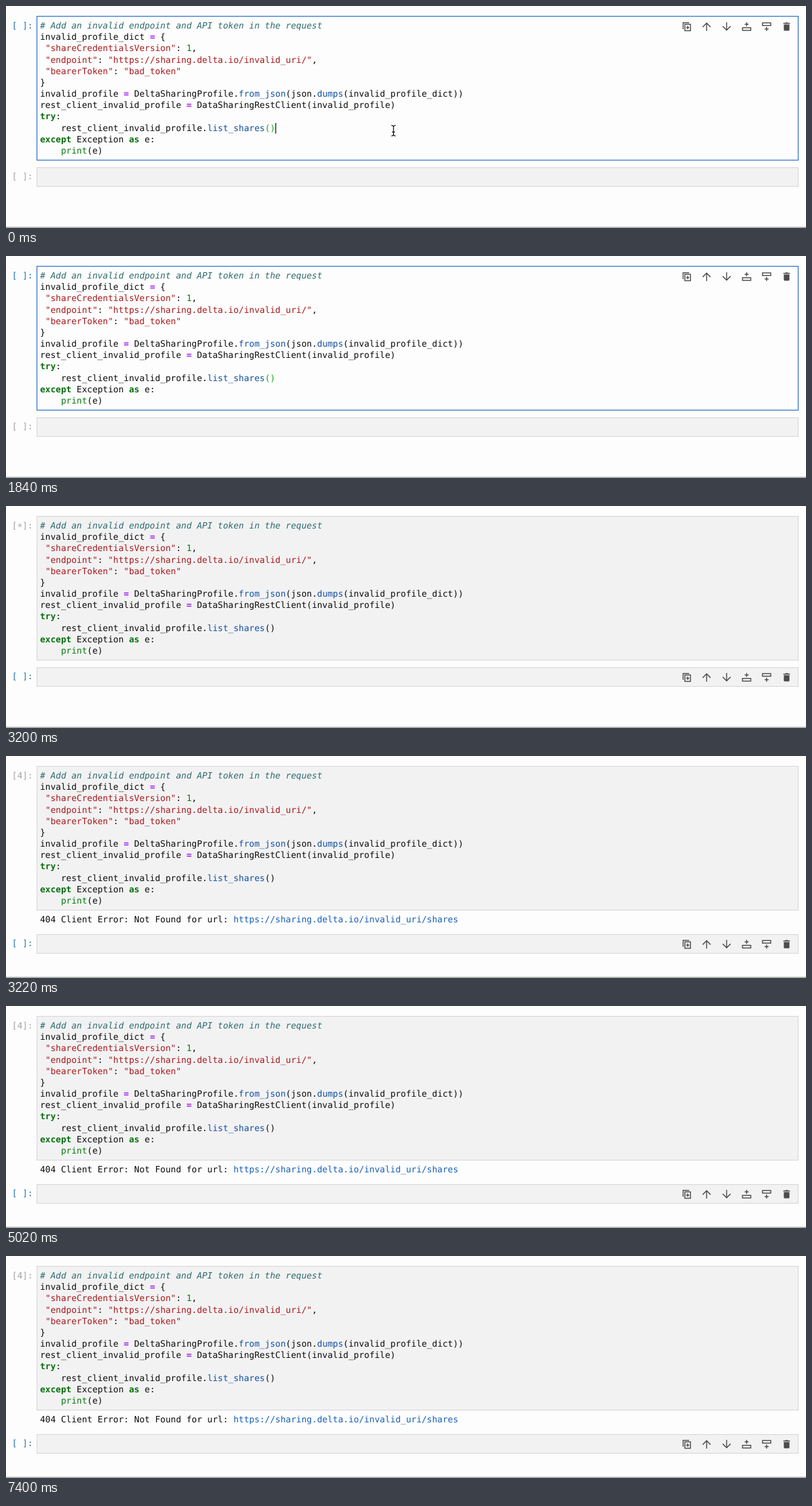
An HTML page that plays this animation: 1280x355 px, repeating every 7500 ms.

```html
<!DOCTYPE html>
<html lang="en">
<head>
<meta charset="utf-8">
<title>Notebook cell run</title>
<style>
  html, body { margin: 0; width: 100%; height: 100%; overflow: hidden; background: #fdfdfd; }
  svg { display: block; width: 1280px; height: 355px; }
  text {
    font: 13.9px "DejaVu Sans Mono", "Liberation Mono", monospace;
    white-space: pre; text-rendering: geometricPrecision; fill: #0c0c0c;
  }
  .comment { fill: #2e6b6d; font-style: italic; }
  .op { fill: #a21ff0; font-weight: bold; }
  .str { fill: #a9191b; }
  .num, .fn { fill: #0a7a0f; }
  .key { fill: #08700d; font-weight: bold; }
  .prop { fill: #1450a0; }
  .link { fill: #175fb8; }
  .editing .match { fill: #12a812; }
  .cell { fill: #f2f2f3; stroke: #d3d3d8; }
  .editing .cell { fill: #fdfdfd; stroke: #2e70c8; stroke-width: 1.3; }
  .prompt { fill: #a3a3a3; }
  .active .prompt { fill: #2470b3; }
  #tools path { fill: none; stroke: #4c4c4c; stroke-width: 1.5; }
  #tools .solid { fill: #4c4c4c; stroke: none; }
</style>
</head>
<body>
<svg viewBox="0 0 1280 355">
  <g id="first">
    <rect class="cell" x="49.5" y="16.5" width="1218" height="230"/>
    <text class="prompt" x="9.5" y="36">[<tspan id="star" dy="2"> </tspan><tspan id="rest" dy="-2">]:</tspan></text>
    <g id="code">
      <text><tspan class="comment"># Add an invalid endpoint and API token in the request</tspan></text>
      <text>invalid_profile_dict <tspan class="op">=</tspan> {</text>
      <text> <tspan class="str">"shareCredentialsVersion"</tspan>: <tspan class="num">1</tspan>,</text>
      <text> <tspan class="str">"endpoint"</tspan>: <tspan class="str">"https://sharing.delta.io/invalid_uri/"</tspan>,</text>
      <text> <tspan class="str">"bearerToken"</tspan>: <tspan class="str">"bad_token"</tspan></text>
      <text>}</text>
      <text>invalid_profile <tspan class="op">=</tspan> DeltaSharingProfile.<tspan class="prop">from_json</tspan>(json.<tspan class="prop">dumps</tspan>(invalid_profile_dict))</text>
      <text>rest_client_invalid_profile <tspan class="op">=</tspan> DataSharingRestClient(invalid_profile)</text>
      <text><tspan class="key">try</tspan>:</text>
      <text>    rest_client_invalid_profile.<tspan class="prop">list_shares</tspan><tspan class="match">()</tspan></text>
      <text><tspan class="key">except</tspan> Exception <tspan class="key">as</tspan> e:</text>
      <text>    <tspan class="fn">print</tspan>(e)</text>
    </g>
  </g>
  <path id="caret" d="M431.6 187v17" stroke="#111" stroke-width="1.3"/>
  <path id="pointer" d="M616.5 190.8q3.5 0 3.5 3v11q0 3-3.5 3M623.5 190.8q-3.5 0-3.5 3v11q0 3 3.5 3M617.7 201.5h4.6"
    fill="none" stroke="#111" stroke-width="1.3"/>
  <text id="output" x="54.5" y="266">404 Client Error: Not Found for url: <tspan class="link">https://sharing.delta.io/invalid_uri/shares</tspan></text>
  <g id="second">
    <rect class="cell" x="49.5" y="258.5" width="1218" height="30"/>
    <text class="prompt" x="9.5" y="277">[ ]:</text>
  </g>
  <g id="tools">
    <g transform="translate(1089 33)">
      <path d="M-5.6 4V-6.3H4M-2.8-3.7H6.2V6.5H-2.8ZM1.7-1.2v5.2M-.9 1.4h5.2"/>
    </g>
    <path transform="translate(1121 33)" d="M0 7V-5M-6.3.6L0-5.7 6.3.6"/>
    <path transform="translate(1153 33)" d="M0-7V5M-6.3-.6L0 5.7 6.3-.6"/>
    <path transform="translate(1185 33)" d="M-6.6 1.7H6.6V6H-6.6ZM0-7V-.6M-3.2-3.8H3.2"/>
    <path transform="translate(1217 33)" d="M-6.6-1.7H6.6V-6H-6.6ZM0 7V.6M-3.2 3.8H3.2"/>
    <path class="solid" transform="translate(1249 33)" d="M-4.5-3.5h9V5q0 1.5-1.5 1.5H-3q-1.5 0-1.5-1.5ZM-5.3-6H-2.5L-1.7-6.8H1.7L2.5-6H5.3v1.5H-5.3Z"/>
  </g>
  <path d="M0 354h1280" stroke="#666"/>
</svg>
<script>
  const LOOP = 7500, RUN = 1940, DONE = 3220, POINTER_OFF = 900, BLINK = 530;
  const $ = id => document.getElementById(id);
  const show = (id, on) => $(id).style.display = on ? '' : 'none';
  const move = (id, y) => $(id).setAttribute('transform', `translate(0 ${y})`);

  [...$('code').children].forEach((line, i) => {
    line.setAttribute('x', 54.5);
    line.setAttribute('y', 36 + i * 18.18);
  });

  function draw(now) {
    const t = now % LOOP, editing = t < RUN, done = t >= DONE;
    const shift = done ? 27 : 0;
    const mark = editing ? ' ' : done ? '4' : '*';
    const drop = mark === '*' ? 2 : 0;
    $('first').setAttribute('class', editing ? 'editing active' : '');
    $('second').setAttribute('class', editing ? '' : 'active');
    $('star').textContent = mark;
    $('star').setAttribute('dy', drop);
    $('rest').setAttribute('dy', -drop);
    show('caret', editing && Math.floor((t + 140) / BLINK) % 2 === 0);
    show('pointer', t < POINTER_OFF);
    show('output', done);
    move('second', shift);
    move('tools', editing ? 0 : 241 + shift);
    requestAnimationFrame(draw);
  }
  requestAnimationFrame(draw);
</script>
</body>
</html>
```
